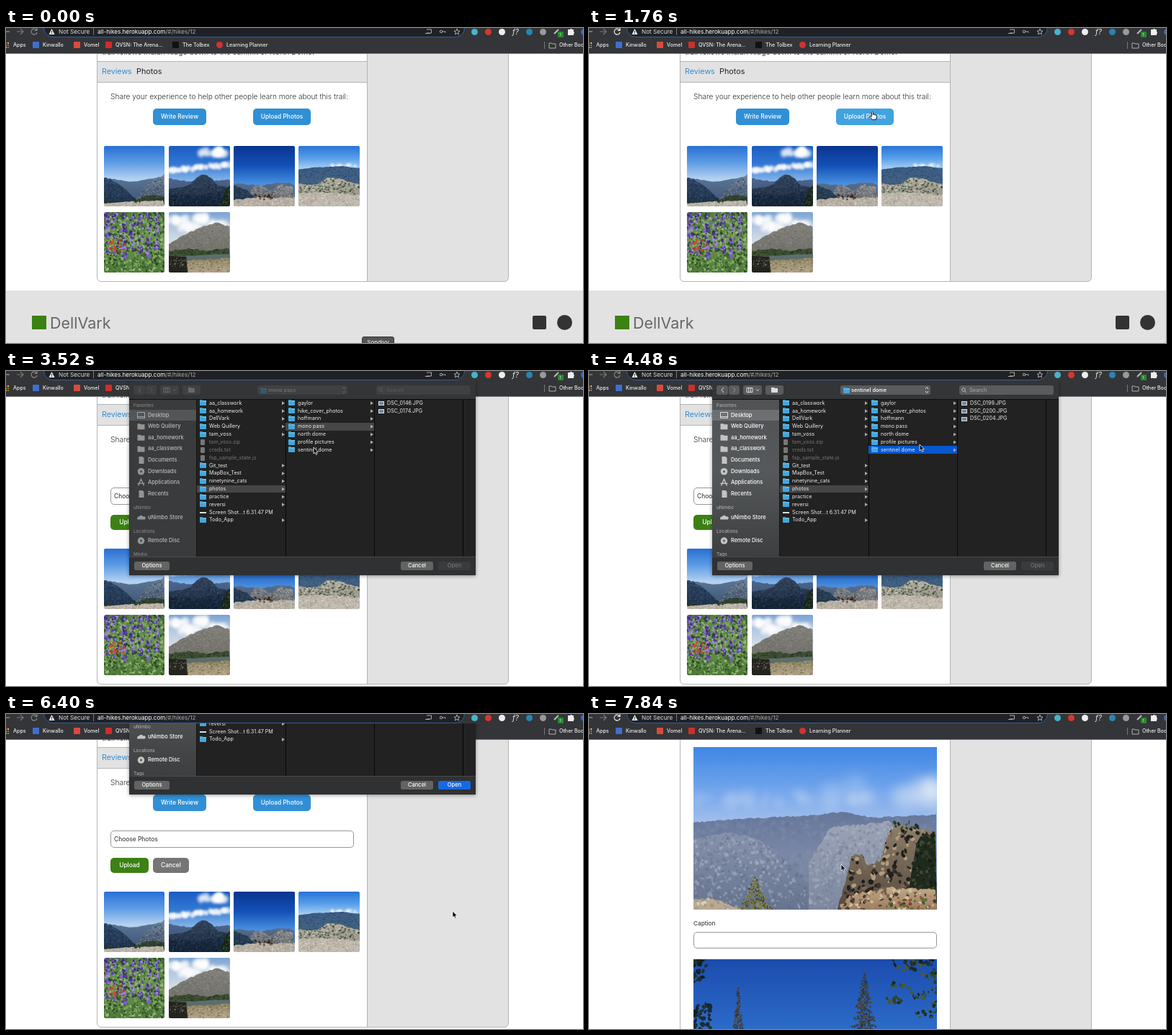
An HTML page with a canvas for the animation above (8 s loop, 801x438 px).

```html
<!DOCTYPE html>
<html lang="en">
<head>
<meta charset="utf-8">
<title>Upload trail photos</title>
<style>
html, body { margin: 0; width: 100%; height: 100%; overflow: hidden; background: #fff; }
#stage { position: relative; width: 801px; height: 438px; overflow: hidden; background: #fff; font-family: Inter, "Open Sans", sans-serif; }
#stage div, #stage canvas, #stage svg { position: absolute; box-sizing: border-box; }
.text { height: 20px; line-height: 20px; white-space: nowrap; }
.button { border-radius: 5px; color: #fff; font-size: 8.4px; font-weight: 500; text-align: center; }
.field { border: 1px solid #979797; border-radius: 5px; background: #fff; }
.folder { background: #43a7db; border-radius: 1px; box-shadow: inset 0 1.5px #6fc3ec; }
.folder::before { content: ""; position: absolute; left: 0; top: -1px; width: 4px; height: 2px; background: #43a7db; border-radius: 1px; }
.arrow { clip-path: polygon(0 0, 100% 50%, 0 100%); }
.key { border-radius: 2.5px; background: #636363; color: #fff; font-size: 7.5px; text-align: center; font-weight: 500; }
</style>
</head>
<body>
<div id="stage"></div>
<script>
const LOOP = 8000, STEP = 160;
const stage = document.getElementById('stage');

function box(parent, x, y, w, h, css = '', cls = '', text = '') {
  const node = document.createElement('div');
  node.className = cls;
  node.style.cssText = `left:${x}px;top:${y}px;width:${w}px;height:${h}px;${css}`;
  node.textContent = text;
  parent.append(node);
  return node;
}
const group = (parent, x = 0, y = 0) => box(parent, x, y, 0, 0);
function label(parent, x, midY, text, size, color, weight = 400) {
  return box(parent, x, midY - 10, 0, 20, `width:auto;font-size:${size}px;color:${color};font-weight:${weight}`, 'text', text);
}
function button(parent, x, y, w, h, color, text) {
  return box(parent, x, y, w, h, `background:${color};line-height:${h}px`, 'button', text);
}
function svg(parent, markup, w = 801, h = 438) {
  parent.insertAdjacentHTML('beforeend', `<svg width="${w}" height="${h}" style="left:0;top:0;overflow:visible" fill="none">${markup}</svg>`);
  return parent.lastElementChild;
}
const show = (node, on) => { node.style.visibility = on ? 'inherit' : 'hidden'; };
const moveTo = (node, x, y) => { node.style.transform = `translate(${x}px,${y}px)`; };

// ---- Landscapes: a sky, then jagged layers of land with flecks ----
let seed = 1;
function random() {
  seed = (seed * 1664525 + 1013904223) % 4294967296;
  return seed / 4294967296;
}
const pick = list => list[Math.floor(random() * list.length)];
function gradient(g, top, bottom, colors) {
  const ramp = g.createLinearGradient(0, top, 0, bottom);
  colors.forEach((c, i) => ramp.addColorStop(i / Math.max(1, colors.length - 1), c));
  return ramp;
}
function sky(g, bottom, ...colors) {
  g.fillStyle = gradient(g, 0, bottom, colors);
  g.fillRect(0, 0, g.canvas.width, g.canvas.height);
}
function scatter(g, colors, x, y, w, h, size, density = .5) {
  for (let n = w * h * density / size ** 2; n > 0; n--) {
    g.fillStyle = pick(colors);
    g.beginPath();
    g.ellipse(x + random() * w, y + random() * h, size * (.3 + random() * .5), size * (.2 + random() * .5), random() * 3, 0, 7);
    g.fill();
  }
}
function land(g, outline, rough, colors, flecks, size = 1.5) {
  const points = outline.split(' ').map(p => p.split(',').map(Number));
  const { height } = g.canvas;
  const top = Math.min(...points.map(p => p[1])), left = points[0][0], right = points.at(-1)[0];
  const path = new Path2D();
  path.moveTo(left, height);
  points.forEach((b, i) => {
    const a = points[i - 1] || b, pieces = Math.max(1, Math.hypot(b[0] - a[0], b[1] - a[1]) / 3);
    for (let k = 1; k <= pieces; k++) {
      path.lineTo(a[0] + (b[0] - a[0]) * k / pieces, a[1] + (b[1] - a[1]) * k / pieces + (random() - .5) * rough);
    }
  });
  path.lineTo(right, height);
  g.fillStyle = gradient(g, top, height, colors);
  g.fill(path);
  if (!flecks) return;
  g.save();
  g.clip(path);
  scatter(g, flecks, left, top - 2, right - left, height - top + 2, size);
  g.restore();
}
function cloud(g, x, y, rx, ry, alpha = .35) {
  g.filter = `blur(${ry / 3}px)`;
  g.globalAlpha = alpha;
  for (let i = 0; i < 14; i++) scatter(g, ['#fff'], x + (random() - .5) * rx * 2, y + (random() - .5) * ry, 1, 1, ry * 1.4, ry * ry * 2);
  g.globalAlpha = 1;
  g.filter = 'none';
}
function pine(g, x, top, height, spread, colors) {
  for (let d = 0; d < height; d += 1.5) {
    const reach = 1 + spread * d / height * (.5 + random() * .5);
    scatter(g, colors, x - reach, top + d, reach * 2, 2, 2, .9);
  }
}

const greens = ['#1c2c1e', '#2f4428', '#445a30'];
const stones = ['#8e877b88', '#d6d0c5', '#a79f92'];
const scenes = {
  valley(g) {
    sky(g, 46, '#2a70d4', '#5c9be6', '#b4d2f0');
    land(g, '0,44 40,50 84,42', 1, ['#5c7798', '#3b5170']);
    land(g, '0,44 16,49 30,60 46,76', 3, ['#304a6b', '#1b2c42'], ['#1d3048', '#46607f88']);
    land(g, '44,74 56,57 68,49 84,40', 3, ['#71839a', '#3a4a5e'], ['#9aa5b288', '#3c4f68']);
    land(g, '0,77 34,80 60,68 84,70', 3, ['#36453b', '#20301f'], greens);
    land(g, '0,80 40,77 84,76', 1, ['#bdb5a9'], stones);
    scatter(g, greens, 34, 74, 18, 5, 2);
  },
  halfDome(g) {
    sky(g, 50, '#1c5cc2', '#3378d4', '#8ab9ea');
    cloud(g, 60, 8, 16, 6, .6);
    for (let x = 8; x < 84; x += 18) cloud(g, x, 34 - x / 10, 8, 4);
    land(g, '0,45 30,50 84,47', 2, ['#4e668c', '#30486a']);
    land(g, '0,60 28,55 40,42 50,39 60,46 66,55 84,58', 1.5, ['#34465f', '#1a2a40'], ['#1c2c42', '#55657a66']);
    land(g, '0,66 40,68 84,62', 4, ['#1f3047', '#142235'], ['#101c2c', '#2c4059']);
    land(g, '70,84 77,62 84,56', 3, ['#15231d'], greens);
  },
  deepSky(g) {
    sky(g, 54, '#0b3590', '#1350b6', '#4a92e2');
    land(g, '0,52 40,55 66,50 84,54', 2, ['#5a6f8b', '#3a4d66']);
    land(g, '18,72 28,56 38,54 50,62 64,53 84,57', 3, ['#8b8c8f', '#5a5f66'], ['#3e4c57', '#a9a6a0', '#5f6f7d']);
    land(g, '0,55 16,60 30,72', 3, ['#2b425d', '#1d3042'], ['#1c3040', '#3c536b']);
    land(g, '0,75 30,72 84,72', 2, ['#b9b1a6'], stones);
    scatter(g, ['#4b3025', '#6d4a38', '#2c211d'], 28, 67, 26, 9, 2.5);
  },
  ridge(g) {
    sky(g, 34, '#2874d8', '#58a0ea', '#b5d6f3');
    cloud(g, 60, 27, 20, 3);
    land(g, '0,33 20,30 60,28 84,31', 1, ['#3a5b82', '#4d6780'], ['#2d4c72', '#52708f88']);
    land(g, '0,52 20,55 44,43 58,46 84,54', 2, ['#b3ada2', '#8f8d80'], ['#2f4630', '#3e5338', '#cfc9bd', '#6d7767'], 2);
    land(g, '0,66 30,64 84,68', 2, ['#c2bbb0'], stones);
  },
  flowers(g) {
    sky(g, 84, '#547f42', '#6a944e', '#4f7a39');
    scatter(g, ['#2b4c25', '#7ea45e', '#9ab781', '#416b30'], 0, 0, 84, 84, 3, .9);
    for (let i = 0; i < 16; i++) {
      const x = i * 23 % 80, y = i * 31 % 60 - 8;
      scatter(g, ['#5a3ca8', '#7d5ccd', '#9c84da', '#3f2c78'], x, y, 7, 28, 3, .9);
    }
    scatter(g, ['#df4027', '#a8402c'], 8, 38, 24, 16, 3, .4);
  },
  lake(g) {
    sky(g, 42, '#7aa3d4', '#b3c9e2', '#d6dde6');
    for (let x = 8; x < 84; x += 20) cloud(g, x, 6 + x * 17 % 22, 14, 7);
    land(g, '0,45 20,32 50,19 66,15 84,20', 2, ['#85837d', '#63645d'], ['#6b6b66', '#9d988f88', '#767570']);
    land(g, '0,54 28,50 50,54 84,50', 3, ['#3d4d33'], greens);
    land(g, '0,62 84,58', 1, ['#5f6f72', '#54654f']);
    land(g, '0,68 84,64', 2, ['#8c845f', '#b5a58c'], ['#6f6a48', '#c3b59d', '#9a8c72']);
    land(g, '0,61 26,62', 0, ['#24241f']);
    scatter(g, ['#777461'], 2, 64, 21, 12, 1.5, .25);
  },
  overlook(g) {
    sky(g, 112, '#3f86e4', '#6fa4ec', '#a9c3ec');
    cloud(g, 280, 62, 90, 22, .12);
    cloud(g, 130, 72, 130, 14, .07);
    land(g, '0,105 60,100 165,95 205,90 250,98 338,94', 2, ['#66779b', '#7d8aa7', '#6a7690'], ['#5e708f33', '#8c99b333'], 6);
    land(g, '0,128 45,118 92,128 140,165 185,225', 3, ['#8793ad', '#66748f'], ['#5d6c8a66', '#b3bac866'], 4);
    land(g, '160,160 190,112 275,103 290,160', 3, ['#9ba3b6', '#7c879e'], ['#6d7a9566', '#b5bac555'], 4);
    land(g, '200,225 212,185 219,151 236,150 240,163 260,158 272,115 286,106 338,120', 6,
      ['#8f7f69', '#54493d'], ['#26221f', '#3a342d', '#b09c7e', '#77695a', '#1f1e1c'], 5);
    land(g, '300,190 310,132 324,120 338,122', 8, ['#20291e'], ['#161c16', '#2b3824', '#3f4a30'], 4);
    scatter(g, greens, 276, 104, 40, 9, 4);
    land(g, '205,222 220,204 270,196 338,198', 5, ['#c0a886', '#9a7c60'], ['#d2bd9c', '#7c5f4a', '#a8866a', '#4a3c30'], 4);
    scatter(g, ['#415a2c', '#5c7436', '#a64d37'], 272, 212, 52, 12, 4, .4);
    land(g, '0,211 32,212 66,225', 3, ['#b9a98f'], stones, 4);
    pine(g, 86, 180, 45, 28, ['#6d7038', '#8b8440', '#454c2a']);
  },
  forest(g) {
    sky(g, 225, '#1b4cae', '#2f70cd', '#70a8df');
    const bark = ['#3c3f3c', '#55483f', '#2c3530'];
    pine(g, 62, 38, 187, 22, bark);
    pine(g, 237, 16, 209, 46, bark);
    const dark = ['#12201c', '#20332a', '#1a2a3c'];
    scatter(g, dark, 0, 0, 18, 32, 5, 1);
    scatter(g, dark, 0, 60, 24, 38, 5, 1);
    for (let i = 0; i < 12; i++) scatter(g, [...greens, '#4c5936'], 338 - 72 * random(), i * 6.5, 26, 9, 4, .8);
    scatter(g, dark, 262, 0, 76, 9, 5);
  }
};
function photo(parent, x, y, w, h, name, radius = 0) {
  const canvas = document.createElement('canvas');
  canvas.width = Math.floor(w);
  canvas.height = Math.floor(h);
  canvas.style.cssText = `left:${x}px;top:${y}px;width:${w}px;height:${h}px;border-radius:${radius}px`;
  seed = name.length * 97 + 11;
  scenes[name](canvas.getContext('2d'));
  parent.append(canvas);
}

// ---- Trail page ----
const page = box(stage, 0, 0, 801, 438);
const panel = box(page, 126, -20, 572, 373, 'border:1px solid #b5b5b5;border-radius:6px;background:linear-gradient(90deg,#fff 374px,#b5b5b5 374px 375px,#e2e2e2 375px)');
label(page, 133, 33, 'trail follows Indian Ridge down to the summit of North Dome.', 10.3, '#333');
box(page, 127, 46, 374, 30, 'background:#e2e2e2;border:solid #b5b5b5;border-width:1px 0');
label(page, 133, 61, 'Reviews', 10.7, '#2f8fd8');
label(page, 181, 61, 'Photos', 10.8, '#222');
label(page, 145, 95, 'Share your experience to help other people learn more about this trail:', 10.17, '#333', 300);
button(page, 204, 112, 74, 23, '#318fd5', 'Write Review');
const uploadPhotos = button(page, 343, 112, 80, 23, '#318fd5', 'Upload Photos');

const form = group(page);
box(form, 145, 162, 338, 23.5, '', 'field');
label(form, 150, 173.5, 'Choose Photos', 8.4, '#444', 500);
const actions = group(form);
button(actions, 145, 200, 53, 21, '#3c8113', 'Upload');
button(actions, 204, 200, 50, 21, '#757575', 'Cancel');

const PREVIEW = 295;
const previews = group(page, 0, 201);
['overlook', 'forest'].forEach((name, i) => {
  const item = group(previews, 145, i * PREVIEW);
  photo(item, 0, 0, 338, 226, name);
  label(item, 0, 245, 'Caption', 8.2, '#444', 500);
  box(item, 0, 257, 338, 23, '', 'field');
});

const gallery = group(page);
['valley', 'halfDome', 'deepSky', 'ridge', 'flowers', 'lake'].forEach((name, i) =>
  photo(gallery, 135.8 + i % 4 * 90.2, 163.6 + (i >> 2) * 92, 84.5, 84.5, name, 2));

const footer = box(page, 0, 365, 801, 73, 'background:#e2e2e2');
box(footer, 36, 35, 20, 19, 'background:#3c8113');
label(footer, 61, 45, 'DellVark', 21.5, '#666');
box(footer, 731, 35, 19, 19, 'background:#333;border-radius:2px');
box(footer, 765, 34, 21, 21, 'background:#333;border-radius:50%');

const tooltip = box(stage, 494, 429, 45, 16, 'background:#555;border:1px solid #333;border-radius:3px;color:#fff;font-size:8px;line-height:14px;text-align:center', '', 'Sondivy');

// ---- Browser bars ----
const bars = box(stage, 0, 0, 801, 36, 'background:linear-gradient(#343538 35px,#77787a 35px);overflow:hidden');
box(bars, 52, -14, 585, 27, 'background:#202124;border:1px solid #315f9c;border-radius:13px');
const nav = svg(bars, `<g stroke="#ddd" stroke-width="1.2">
  <path stroke="#999" d="M-3 5H5"/><path stroke="#777" d="M15 5H24M20 1L24 5L20 9"/>
  <path class="reload" d="M42.5 3A4 4 0 1 0 43 6M43 0V3.5H39.5"/></g>
  <path fill="#eee" d="M63.5 1L67.5 9H59.5Z"/><path stroke="#222" d="M63.5 4V6.5M63.5 7V8"/>
  <path stroke="#777" d="M121.5 0V10M747.5 19V29"/>
  <g stroke="#bbb" stroke-width=".9"><path d="M584 2H590.5V7H584M582 7.5H588"/><circle cx="604" cy="5" r="1.7"/><path d="M606 5H610V6.5"/>
  <path d="M626 1L627.2 4L630 4.2L627.8 6L628.5 9L626 7.3L623.5 9L624.2 6L622 4.2L624.8 4Z"/>
  <path d="M754 21H757L758 22H763V28H754Z"/></g>
  <path stroke="#bbb" stroke-width="2" d="M761 8L767 2"/><rect x="766" y="5" width="8" height="8" rx="1" fill="#278a2d"/>
  <path fill="#eee" d="M780 2H783A1.7 1.7 0 0 1 786 2H788V5A1.7 1.7 0 0 1 788 8V10H780Z"/>`, 801, 36);
const reload = nav.querySelector('.reload');
['#45b4cc', '#d7372e', '#eee', '', '#2785b5', '#999', '', '', '#346bc1'].forEach((color, i) => {
  if (color) box(bars, 645.5 + i * 19.1, .5, 9, 9, `background:${color};border-radius:50%`);
});
label(bars, 73, 5, 'Not Secure', 8.2, '#ddd');
const host = label(bars, 127, 5, 'all-hikes.herokuapp.com', 8.1, '#fff');
host.insertAdjacentHTML('beforeend', '<span style="color:#aaa">/#/hikes/12</span>');
label(bars, 703, 5, 'f?', 10, '#eee').style.fontStyle = 'italic';
label(bars, 768.5, 9, '1', 5, '#fff');
for (let i = 0; i < 6; i++) box(bars, i % 2 * 3 - 1, 20 + (i >> 1) * 3, 2, 2, `background:${['#d84b3c', '#e6b93c', '#4b9b57'][i % 3]}`);
[
  ['Apps', 10], ['Kinwallo', 51, '#3d70cf'], ['Vomel', 108, '#d94a3c'], ['QVSN: The Arena...', 152, '#cf2e2a'],
  ['The Tolbex', 245, '#111'], ['Learning Planner', 306, '#cf3434', '50%'], ['Other Bookmarks', 768]
].forEach(([text, x, color, radius = '1px']) => {
  if (color) box(bars, x - 14, 19, 9, 9, `background:${color};border-radius:${radius}`);
  label(bars, x, 24, text, 7.1, '#eee', 500);
});

// ---- File chooser ----
const clip = box(stage, 145, 13, 535, 425, 'overflow:hidden');
const dialog = box(clip, 26, 0, 481, 271, 'background:#222;box-shadow:0 1px 5px #0006');
const area = group(dialog, -171, -13);
box(area, 171, 13, 481, 27, 'background:#343536;border-bottom:1px solid #111');
const tools = group(area);
[[177, 16], [194, 15], [214, 26], [245, 25], [349, 125], [514, 131]].forEach(([x, w]) =>
  box(tools, x, 20, w, 13, 'background:#5a5b5d;border-radius:3px'));
svg(tools, `<path stroke="#ddd" d="M187 23L184 26.5L187 30M219 23.5H227V29.5H219ZM221.7 23.5V29.5M224.4 23.5V29.5M232 25.5L234 27.5L236 25.5M467 25L469 22.5L471 25M467 28L469 30.5L471 28"/>
  <path stroke="#999" d="M200 23L203 26.5L200 30"/><path fill="#ddd" d="M253 23H257L258 24H262V30H253Z"/>
  <circle cx="520" cy="26" r="2.3" stroke="#bbb"/><path stroke="#bbb" d="M522 28L524 30"/>`);
box(tools, 353, 23.5, 9, 7, '', 'folder');
const title = label(tools, 364, 26.5, '', 7.3, '#fff', 500);
label(tools, 528, 26.5, 'Search', 7.3, '#aaa');

const sidebar = box(area, 171, 40, 94, 218, 'border-right:1px solid #151515;overflow:hidden');
const places = group(sidebar, -171, -40);
box(places, 171, 54, 93, 15, 'background:#85898d88');
const glyphs = {
  folder: '<path fill="#c4c4c4" d="M-5-4H-1L0-3H5V4H-5Z"/>',
  disc: '<circle r="4.8" fill="#c4c4c4"/><circle r="1.5" fill="#555"/>',
  screen: '<path stroke="#ddd" d="M-5-4H5V4H-5ZM-5 2H5"/>',
  sheet: '<path fill="#c4c4c4" d="M-3-5H2L4-3V5H-3Z"/>',
  tools: '<path stroke="#ccc" stroke-width="1.3" d="M-4 4L0-5L4 4M-5 1H5"/>',
  cloud: '<path fill="#c4c4c4" d="M-5 3A2.5 2.5 0 0 1-3-1A3.5 3.5 0 0 1 3-1A2 2 0 0 1 5 3Z"/>'
};
// Entries without a glyph are group headings.
let placeY = 29, afterHeading = false, lastHeading;
[
  'Favorites', 'Desktop:screen', 'Web Quillery:folder', 'aa_homework:folder', 'aa_classwork:folder', 'Documents:sheet',
  'Downloads:disc', 'Applications:tools', 'Recents:sheet', 'uNimbo', 'uNimbo Store:cloud', 'Locations', 'Remote Disc:disc', 'Tags'
].forEach(entry => {
  const [text, glyph] = entry.split(':');
  placeY += !glyph ? 19 : afterHeading ? 13.5 : 15.65;
  afterHeading = !glyph;
  if (glyph) {
    svg(places, `<g transform="translate(187.5 ${placeY})">${glyphs[glyph]}</g>`);
    label(places, 197, placeY, text, 7.45, '#fff', 500);
  } else lastHeading = label(places, 177, placeY, text, 6.4, '#aaa', 500);
});

for (let i = 0; i < 3; i++) box(area, 388 + i * 123, 40, 1, 218, 'background:#080808');
const ROW = 10.85;
function row(parent, x, i, text, kind) {
  const node = box(parent, x, 39.3 + i * ROW, 123, ROW);
  if (kind === 'folder') {
    box(node, 4, 2, 9, 7, '', 'folder');
    box(node, 118, 3, 4, 5, 'background:#aaa', 'arrow');
  } else if (kind === 'image') box(node, 5, 2.5, 8, 6, 'background:#6d87a5;border:1px solid #ddd');
  else if (kind === 'strip') box(node, 4, 4.5, 9, 2, 'background:#ddd');
  else box(node, 5, 1.5, 6, 8, 'background:#777;border-radius:1px');
  label(node, 17, 5.4, text, 7.15, kind === 'dim' ? '#777' : '#eee');
  return node;
}
const column = (x, names, kindOf) => {
  const list = group(area);
  return { list, rows: names.map((name, i) => row(list, x, i, name, kindOf(name))) };
};
const kindOfEntry = name => /\.(zip|txt|js)$/.test(name) ? 'dim' : /PM$/.test(name) ? 'strip' : 'folder';
const desktop = column(265, ['aa_classwork', 'aa_homework', 'DellVark', 'Web Quillery', 'tam_voss', 'tam_voss.zip', 'creds.txt',
  'fsp_sample_state.js', 'Git_test', 'MapBox_Test', 'ninetynine_cats', 'photos', 'practice', 'reversi',
  'Screen Shot...t 6.31.47 PM', 'Todo_App'], kindOfEntry);
const folders = column(388, ['gaylor', 'hike_cover_photos', 'hoffmann', 'mono pass', 'north dome', 'profile pictures', 'sentinel dome'], kindOfEntry);
const monoFiles = column(512, ['DSC_0146.JPG', 'DSC_0174.JPG'], () => 'image');
const domeFiles = column(512, ['DSC_0199.JPG', 'DSC_0200.JPG', 'DSC_0204.JPG'], () => 'image');
const GREY = '#464646', BLUE = '#0757cf';
desktop.rows[11].style.background = GREY;

box(area, 171, 258, 481, 26, 'background:#303132;border-top:1px solid #4a4a4a');
const key = (x, w, text) => box(area, x, 265, w, 12, 'line-height:12px', 'key', text);
key(178, 49, 'Options');
key(548, 45, 'Cancel');
const open = key(600, 45, 'Open');

// ---- Pointer ----
const pointer = group(stage);
const arrow = svg(pointer, '<path d="M0 0V9L2 7.2L3.5 10.3L5 9.6L3.6 6.7H6.3Z" fill="#000" stroke="#fff" stroke-width=".8"/>', 8, 12);
const hand = svg(pointer, '<path d="M-1 6V1Q0-1 1 1V4Q2 3 3 4.3Q4 3.5 5 5Q6.5 4.8 6.3 7L5 11H0L-3.7 6.7Q-3.5 4.8-1 7Z" fill="#fff" stroke="#000" stroke-width=".9"/>', 8, 12);

// ---- Timing ----
function ease(t, from, duration) {
  const p = Math.min(1, Math.max(0, (t - from) / duration));
  return p * p * (3 - 2 * p);
}
// Each stop is the arrival time and place; the pointer rests between moves.
const stops = [
  [160, 519, 440], [1600, 390, 113], [2240, 411, 135], [2720, 300, 172], [3520, 427, 106],
  [4480, 459, 102], [4960, 550, 45], [5440, 550, 66], [6080, 620, 274], [7200, 350, 209]
];
function pointerAt(t) {
  return stops.reduce(([x, y], [arrival, nextX, nextY], i) => {
    const start = Math.max(stops[i - 1]?.[0] ?? 0, arrival - 800);
    const p = ease(t, start, arrival - start);
    return [x + (nextX - x) * p, y + (nextY - y) * p];
  }, stops[0].slice(1));
}

function render(t) {
  const formOpen = t >= 2080, uploaded = t >= 6880, ready = t >= 3680, dome = t >= 3840;
  const picked = t < 4960 ? 0 : t < 5440 ? 1 : 3;
  const blurred = t < 480 || (t >= 2880 && t < 6720);
  const extra = uploaded ? 2 * PREVIEW : 0;
  const shift = (formOpen ? 83 : 0) + extra;

  show(tooltip, t < 320);
  show(form, formOpen);
  show(previews, uploaded);
  moveTo(actions, 0, extra);
  moveTo(gallery, 0, shift);
  moveTo(footer, 0, shift);
  panel.style.height = 373 + shift + 'px';
  moveTo(page, 0, -155 * ease(t, 7040, 800));
  uploadPhotos.style.background = t >= 1600 && t < 2400 ? '#41a3df' : '#318fd5';
  reload.style.stroke = blurred ? '#888' : '#eee';

  moveTo(dialog, 0, -344 * (1 - ease(t, 2720, 480) + ease(t, 6240, 320)));
  tools.style.opacity = ready ? 1 : .3;
  places.style.opacity = ready ? 1 : .65;
  sidebar.style.background = ready ? 'linear-gradient(#505254,#56595b 45%,#3c3e3f)' : '#393b3c';
  title.textContent = dome ? 'sentinel dome' : 'mono pass';
  lastHeading.textContent = ready ? 'Tags' : 'Media';
  folders.rows[3].style.background = dome ? '' : GREY;
  folders.rows[6].style.background = !dome ? '' : picked ? GREY : BLUE;
  show(monoFiles.list, !dome);
  show(domeFiles.list, dome);
  domeFiles.rows.forEach((node, i) => { node.style.background = i < picked ? BLUE : ''; });
  open.style.background = picked ? '#1768e5' : '#3b3b3b';
  open.style.color = picked ? '#fff' : '#777';

  const overLink = t >= 1600 && t < 2880;
  show(pointer, t >= 160);
  show(hand, overLink);
  show(arrow, !overLink);
  moveTo(pointer, ...pointerAt(t));
}

const start = performance.now();
function tick() {
  const t = (performance.now() - start) % LOOP;
  render(Math.floor(t / STEP) * STEP);
  requestAnimationFrame(tick);
}
tick();
</script>
</body>
</html>
```
